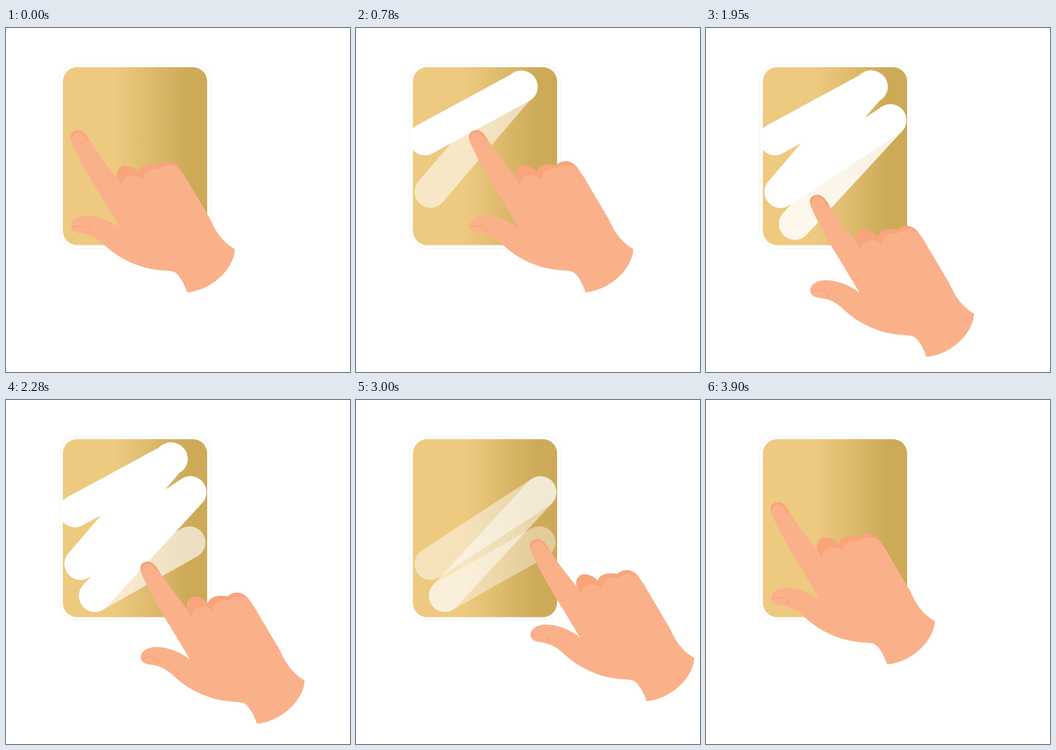
These frames come from a looping animation (720x720 px, 3930 ms). An HTML page:

```html
<!DOCTYPE html>
<html lang="en">
<head>
<meta charset="utf-8">
<title>Scratch card</title>
<style>
  html, body { margin: 0; width: 100%; height: 100%; overflow: hidden; background: #fff; }
  svg { display: block; width: 100%; height: 100%; }
</style>
</head>
<body>
<svg viewBox="0 0 720 720">
  <defs>
    <linearGradient id="gold" gradientUnits="userSpaceOnUse" x1="228" y1="0" x2="382" y2="0">
      <stop offset="0" stop-color="#edca80"/>
      <stop offset="1" stop-color="#cdaa58"/>
    </linearGradient>
    <clipPath id="face"><rect x="119" y="82" width="302" height="372.5" rx="30"/></clipPath>
  </defs>

  <rect x="112.5" y="75.5" width="316" height="386" rx="36" fill="#fff" stroke="#000" stroke-opacity=".07"/>
  <rect x="119" y="82" width="302" height="372.5" rx="30" fill="url(#gold)"/>
  <g id="strokes" clip-path="url(#face)" stroke="#fff" stroke-width="67" stroke-linecap="round"></g>

  <g id="hand">
    <path fill="#f9a47b" d="M243 334L232 311C230 297 238 288 249 287.500C260 288 270 293 277 301
      C281 288 295 283 318 287C330 275 352 275 365 297L340 330Z"/>
    <path fill="#fab18a" d="M135 230C134 220 142 214 151 214C161 214 167 222 174 233
      C190 261 213 288 234 315L243 333C241 318 252 309 264 309C273 309 280 311 286 317
      C287 303 301 292 320 295C330 286 350 284 364 296C372 305 379 318 386 330L428 401
      C441 432 458 451 479 463C477 505 430 549 379 553.500C375 540 367 524 358 515
      C351 508 343 508.500 330 507.500C285 505 245 487 216 463C205 454 195 443 184 438
      C174 433 162 430 150 429C142 427 136 422 136 413C138 400 152 393 168 393
      C195 393 220 405 239 419L205 362C185 330 155 281 137 238Z"/>
    <path fill="#f9a47b" d="M136 231C134 220 142 214 151 214C161 214 168 223 174 234L170 237
      C165 227 160 219 151 219C144 219 139 224 139 233Z"/>
    <path fill="none" stroke="#f9a47b" stroke-width="2" stroke-linecap="round"
      d="M151 244Q160 237 173 236M138 418C147 412 164 413 175 422Q171 424 171 428"/>
  </g>
</svg>
<script>
  const LOOP = 3930;

  // Stroke endpoints, fade-in window, fade-out window
  const strokes = [
    { line: [144, 233, 347, 123], show: [450, 590], hide: [2460, 2830] },
    { line: [345, 122, 156, 343], show: [610, 915], hide: [2460, 2830] },
    { line: [156, 343, 386, 193], show: [960, 1250], hide: [2830, 3150] },
    { line: [386, 193, 186, 410], show: [1680, 2000], hide: [2840, 3170] },
    { line: [186, 410, 384, 298], show: [2080, 2400], hide: [2810, 3130] }
  ];

  // Hand offsets: time, x, y
  const handKeys = [
    [0, 0, 0], [450, 0, 0], [610, 192, -102], [960, 4, 109], [1288, 229, -31],
    [1680, 229, -31], [2080, 37, 186], [2450, 229, 77], [3160, 229, 77],
    [3570, 0, 0], [LOOP, 0, 0]
  ];

  const hand = document.getElementById("hand");
  const group = document.getElementById("strokes");
  const progress = (t, [from, to]) => Math.min(1, Math.max(0, (t - from) / (to - from)));
  const ease = u => (1 - Math.cos(Math.PI * u)) / 2;

  for (const stroke of strokes) {
    const el = stroke.el = document.createElementNS("http://www.w3.org/2000/svg", "line");
    ["x1", "y1", "x2", "y2"].forEach((name, i) => el.setAttribute(name, stroke.line[i]));
    group.append(el);
  }

  function handAt(t) {
    const next = handKeys.findIndex(key => key[0] > t);
    const [t0, x0, y0] = handKeys[next - 1];
    const [t1, x1, y1] = handKeys[next];
    const u = ease(progress(t, [t0, t1]));
    return [x0 + (x1 - x0) * u, y0 + (y1 - y0) * u];
  }

  function draw() {
    const t = performance.now() % LOOP;
    for (const { el, show, hide } of strokes) {
      el.setAttribute("opacity", progress(t, show) * (1 - progress(t, hide)));
    }
    hand.setAttribute("transform", `translate(${handAt(t)})`);
    requestAnimationFrame(draw);
  }
  draw();
</script>
</body>
</html>
```
